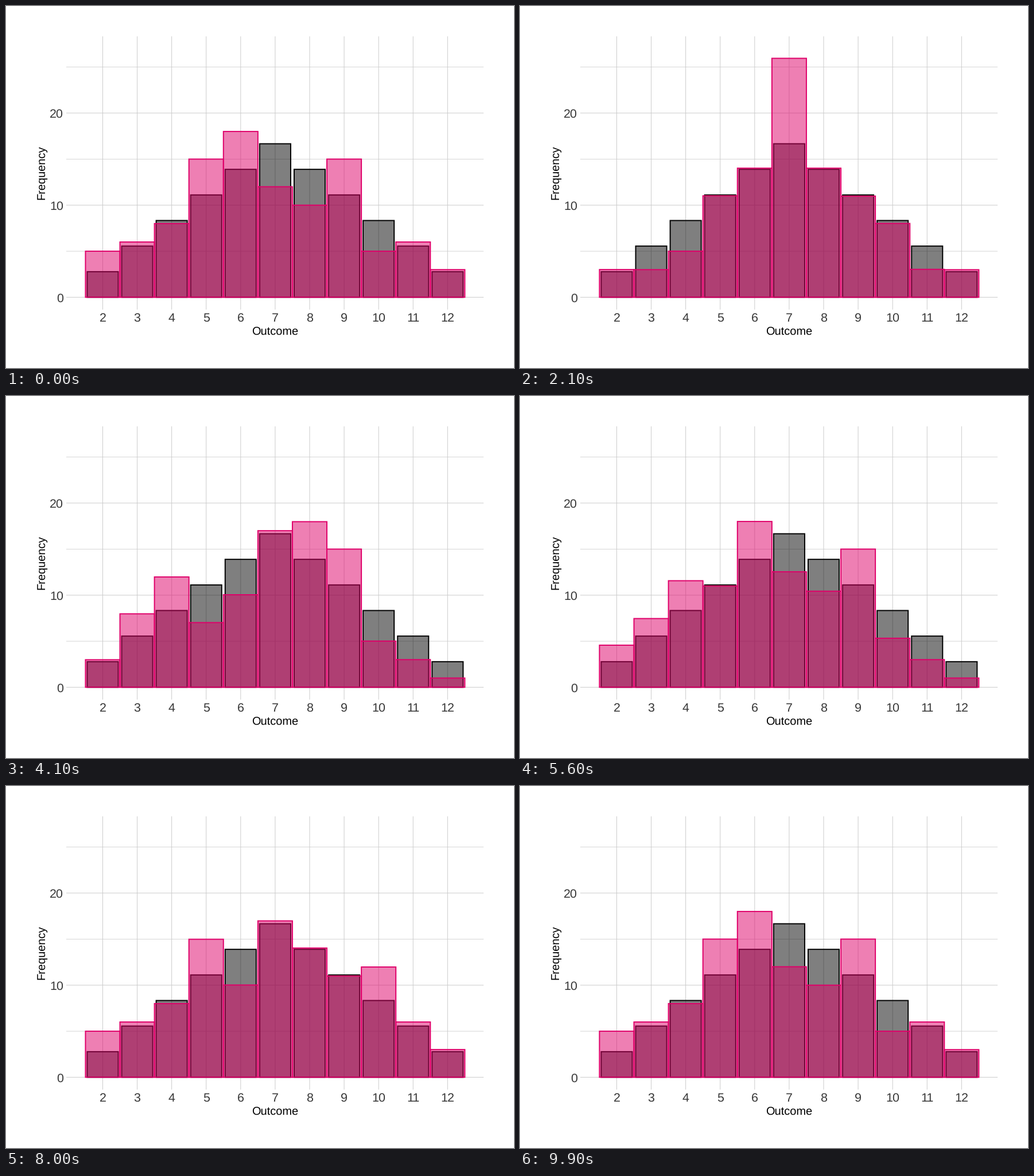
These frames come from a looping animation (885 px wide and 632 px high, 10 s). A matplotlib script:

```python
import numpy as np
import matplotlib.pyplot as plt
from matplotlib.animation import FuncAnimation
from matplotlib.colors import to_rgba
from matplotlib.patches import Rectangle

W, H, DPI = 885, 632, 100
PT = 72 / DPI  # points per pixel
LEFT, RIGHT, TOP, BOTTOM = 105.4, 832.4, 52.65, 530.2
PINK = "#df0069"
FRAMES, ROLLS = 100, 100

# Sum of two dice: triangular odds, binomial spread of the counts
OUTCOMES = np.arange(2, 13)
ODDS = (6 - abs(OUTCOMES - 7)) / 36
EXPECTED = ROLLS * ODDS
SPREAD = np.sqrt(EXPECTED * (1 - ODDS))

# Totals that came up too often (+) or too rarely (-) in each run
SWINGS = [
    (2, 5, 6, 9, -7, -8, -10),
    (3, 5, -2, -11, -12, -12),
    (7, 7, -3, -4, -11),
    (2, 5, 6, 8, 10, 11, 11, -3, -4, -7, -9, -12),
    (3, 4, 8, 9, -5, -6, -10, -11, -12),
    (6, 9, -2, -3, -11, -12),
    (2, 3, 4, 6, 9, -7, -8, -10, -11, -12),
    (2, 7),
    (2, 5, 10, -6),
    (2, 8, 8, 12, -7, -10),
]


def counts(swing):
    h = EXPECTED.copy()
    for s in swing:
        i = abs(s) - OUTCOMES[0]
        h[i] += np.sign(s) * 1.2 * SPREAD[i]
    return np.maximum(np.round(h), 0)


RUNS = [counts(s) for s in SWINGS]
N = len(RUNS)

plt.rcParams["font.family"] = "Liberation Sans"
plt.rcParams["text.hinting"] = "none"
fig = plt.figure(figsize=(W / DPI, H / DPI), dpi=DPI, facecolor="white")
ax = fig.add_axes([LEFT / W, 1 - BOTTOM / H, (RIGHT - LEFT) / W, (BOTTOM - TOP) / H])
ax.set(xlim=(0.95, 13.05), ylim=(-1.35, 28.35))
ax.axis("off")


def x_px(v):
    return LEFT + (v - 0.95) / 12.1 * (RIGHT - LEFT)


def y_px(v):
    return BOTTOM - (v + 1.35) / 29.7 * (BOTTOM - TOP)


def label(x, y, text, size, color, ha="center", angle=0):
    fig.text(x / W, 1 - y / H, text, fontsize=size * PT, color=color, ha=ha,
             va="baseline", rotation=angle, rotation_mode="anchor")


def bar(x, height, width, color):
    rect = Rectangle((x - width / 2, 0), width, height, fc=to_rgba(color, 0.5),
                     ec=color, lw=1.95 * PT, clip_on=False, snap=False)
    return ax.add_patch(rect)


grid = dict(color="#cccccc", zorder=0, snap=False)
for y in range(0, 26, 5):
    major = y % 10 == 0
    ax.axhline(y, lw=(1.0 if major else 0.8) * PT, **grid)
    if major:
        label(99.8, y_px(y) + 8.2, str(y), 21.5, "#383838", ha="right")
for x in OUTCOMES:
    ax.axvline(x, lw=1.0 * PT, **grid)
    label(x_px(x), 551, str(x), 21.5, "#383838")
label(468.9, 575.2, "Outcome", 20, "black")
label(67.4, 291.2, "Frequency", 20, "black", angle=90)

for x, h in zip(OUTCOMES, EXPECTED):
    bar(x, h, 0.9, "black")
bars = [bar(x, h, 1, PINK) for x, h in zip(OUTCOMES, RUNS[0])]


def key_frame(k):
    """Spread the runs evenly over the loop, rounding halves down."""
    return ((FRAMES - 1) * k + N // 2 - 1) // N


def ease(t):
    """Cubic in-out."""
    return 4 * t**3 if t < 0.5 else 1 - 4 * (1 - t)**3


def update(i):
    k = max(k for k in range(N) if key_frame(k) <= i)
    f = ease((i - key_frame(k)) / (key_frame(k + 1) - key_frame(k)))
    heights = (1 - f) * RUNS[k] + f * RUNS[(k + 1) % N]
    for rect, h in zip(bars, heights):
        rect.set_height(h)
    return bars


anim = FuncAnimation(fig, update, frames=FRAMES, interval=100, repeat=True,
                     repeat_delay=0, blit=False)
plt.show()
```
